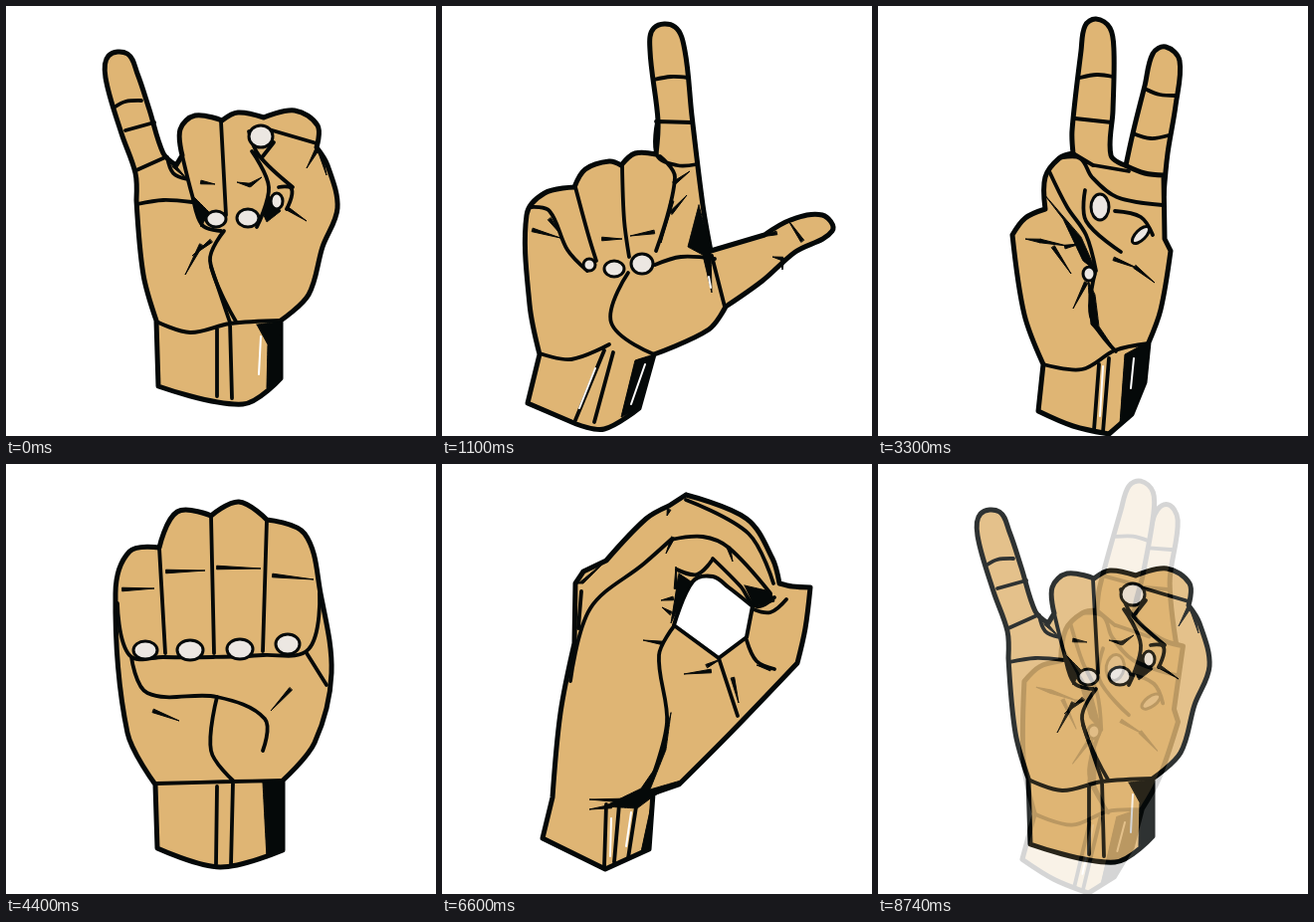
An HTML page for the animation above (8800 ms loop, 432x432 px).

```html
<!DOCTYPE html>
<html lang="en">
<head>
<meta charset="utf-8">
<title>Hand signs</title>
<style>
html, body { margin: 0; width: 100%; height: 100%; overflow: hidden; background: #fff; }
svg {
  position: absolute; inset: 0; width: 100%; height: 100%; background: #fff;
  animation: show 8800ms infinite;
  /* each sign starts fading in 300 ms before its turn */
  animation-delay: calc(var(--i) * 1100ms - 9104ms);
}
@keyframes show {
  0% { opacity: 0; z-index: 2; animation-timing-function: steps(6, start); }
  4.0909% { opacity: 1; z-index: 2; animation-timing-function: step-end; }
  12.5% { opacity: 1; z-index: 1; animation-timing-function: step-end; }
  16.6% { opacity: 0; z-index: 0; animation-timing-function: step-end; }
  100% { opacity: 0; z-index: 0; }
}
path, ellipse { stroke: #050909; stroke-linecap: round; stroke-linejoin: round; }
.skin { fill: #dfb574; stroke-width: 5; }
.line { fill: none; stroke-width: 3.8; }
.nick, .ink { fill: #050909; stroke-width: 1; }
.hole { fill: #fff; stroke-width: 4; }
.gap { fill: none; stroke: #fff; stroke-width: 2; }
ellipse { fill: #ece7e2; stroke-width: 3; }
</style>
</head>
<body>
<!-- I -->
<svg viewBox="0 0 432 432" style="--i:0">
  <path class="skin" data-p="100,72 103,50 122,48 132,68 144,104 158,148 171,160! 177,150! 175,124 190,110 217,115! 233,107 259,112! 290,105 313,120 312,142! 323,160 333,203 318,242 304,290 276,316! 276,374! 238,400 153,382! 151,316! 138,270 131,195! 130,168 116,128"/>
  <path class="line" data-p="110,101 120,96 136,95;120,125 149,117;131,165 160,152;132,199 158,195 187,197;162,152 168,168 182,174;177,150 187,190 197,220 216,226;216,116 221,210"/>
  <path class="line" data-p="247,146 264,182 252,222;244,126 254,150 288,182;258,151 269,137;264,124 312,138;219,226 205,256 231,317;274,182 287,184 282,204"/>
  <path class="line" data-p="151,317 185,328 225,319 276,316;212,324 212,392;225,318 227,394;206,262 225,318"/>
  <path class="nick" data-p="196,177 210,179;206,236 187,251;196,240 180,270;245,180 232,177;245,180 257,172;282,203 302,216;312,145 302,163;316,148 322,170;168,160 182,174"/>
  <path class="ink" data-p="187,190! 204,207! 196,222!;258,208! 264,190! 276,206! 262,217!;252,320! 276,317! 276,374! 262,384! 263,340!"/>
  <ellipse cx="211" cy="214" rx="10" ry="8"/>
  <ellipse cx="243" cy="213" rx="11" ry="9"/>
  <ellipse cx="256" cy="131" rx="12" ry="11"/>
  <ellipse cx="272" cy="196" rx="6" ry="8"/>
  <path class="gap" data-p="256,332 254,370"/>
</svg>
<!-- L -->
<svg viewBox="0 0 432 432" style="--i:1">
  <path class="skin" data-p="209,45 213,22 234,21 244,45 251,110 262,200 270,246! 324,230! 350,215 382,210 392,226 355,247 322,276 285,302! 268,325 213,350! 198,404! 163,425 135,420! 86,399! 98,350! 88,300 85,210 103,188 133,182! 144,164 168,156 180,160! 194,148 215,149! 217,115"/>
  <path class="line" data-p="213,74 230,71 247,72;215,116 251,117;216,117 216,150 236,160 256,159;219,151 234,172 215,246;181,160 183,215 188,252;134,182 147,230 155,256;90,202 108,206 126,245 146,266"/>
  <path class="line" data-p="214,260 240,252 274,254;187,268 170,318 213,350;271,251 284,302;98,349 130,355 168,340;163,346 134,416;172,348 153,418"/>
  <path class="nick" data-p="233,178 249,166;231,196 220,238;230,208 246,190;161,234 181,234;213,227 189,231;91,225 119,233;108,214 119,229;336,228 320,232;342,254 332,252;342,254 342,265;362,236 347,214"/>
  <path class="ink" data-p="258,200! 270,246! 271,288! 262,250! 247,242!;213,350! 198,404! 180,413! 194,356!"/>
  <ellipse cx="148" cy="260" rx="6" ry="6"/>
  <ellipse cx="173" cy="264" rx="10" ry="8"/>
  <ellipse cx="201" cy="259" rx="11" ry="10"/>
  <path class="gap" data-p="268,272 270,283;154,364 138,404;204,360 190,400"/>
</svg>
<!-- O -->
<svg viewBox="0 0 432 432" style="--i:2">
  <g id="ring">
    <path class="skin" data-p="245,31! 306,55 332,95 339,120! 352,123 370,124! 365,165 357,200! 290,270 238,322! 212,331! 208,387! 164,407! 101,376! 111,335! 119,250 133,180! 134,120! 142,108! 165,97! 205,55 228,42!"/>
    <path class="hole" data-p="233,162! 252,118 272,113 288,124 312,143! 306,174! 278,195!"/>
    <path class="line" data-p="245,36 308,70 333,120;230,76! 262,73 288,84 330,130;230,76 203,100 149,145 129,218;140,128 137,165;272,95 300,123 316,143 334,134;236,106 256,111 271,97"/>
    <path class="line" data-p="313,146 330,149 346,136;233,163 218,192 226,260 208,324;306,177 316,198 334,206;278,195 297,253;165,342 163,405;178,342 173,400;196,338 187,396"/>
    <path class="nick" data-p="228,46 226,52;232,74 225,90;288,84 292,98;235,125 235,103;232,135 220,137;222,180 202,177;230,150 221,144;270,208 243,211;266,203 280,196;330,206 316,202;292,215 298,240;170,344 148,347;180,338 148,337"/>
    <path class="ink" data-p="230,250! 225,287! 209,327! 240,318! 212,334! 196,346! 163,344! 200,326! 218,300!;137,120! 166,96! 142,120!;213,330! 208,386! 200,390!;238,110! 250,118! 230,160!;304,122! 330,128! 334,138! 314,143!"/>
    <path class="gap" data-p="190,350 185,384;170,356 169,394"/>
  </g>
</svg>
<!-- V -->
<svg viewBox="0 0 432 432" style="--i:3">
  <path class="skin" data-p="248,165! 256,128 268,80 276,48 289,41 303,55 299,100 291,148 287,190!"/>
  <path class="line" data-p="270,84 283,89 300,90;256,128 274,133 292,130"/>
  <g id="palm">
    <path class="skin" data-p="204,45 208,20 219,13 233,22 237,45 236,105 234,150 248,160! 268,168 287,170! 288,234! 294,246! 284,305 272,338! 268,378! 255,410! 232,430! 196,422 161,407! 166,360! 147,310 135,230! 148,213 168,204! 168,172 182,153 196,148! 195,125"/>
    <path class="line" data-p="203,72 220,69 236,71;198,113 235,117;196,148 216,160;182,153 203,153 215,172 240,192 286,200;172,166 190,202 209,230 219,266;217,160 252,166"/>
    <path class="line" data-p="208,185 209,216 244,247;238,206 264,212 276,230;218,268 214,312 239,347;166,360 205,365 238,346 272,339;222,360 217,426;232,354 226,428"/>
    <path class="nick" data-p="163,236 148,234;163,236 190,241;188,242 203,239;176,242 194,269;209,278 196,304;237,254 262,264;258,262 278,278"/>
    <path class="ink" data-p="166,188! 204,232! 219,266! 206,256! 186,214!;211,276! 218,290! 222,322! 239,347! 214,320!;272,337! 268,380! 254,411! 243,420! 248,350!"/>
    <ellipse cx="223" cy="202" rx="9" ry="13"/>
    <ellipse cx="212" cy="269" rx="6" ry="7"/>
    <ellipse cx="264" cy="230" rx="11" ry="5" transform="rotate(-45 264 230)"/>
    <path class="gap" data-p="226,362 223,412;257,354 254,384"/>
  </g>
</svg>
<!-- E -->
<svg viewBox="0 0 432 432" style="--i:4">
  <path class="skin" data-p="110,130 124,88 154,84! 172,48 206,52! 234,38 262,56! 300,70 316,130 327,210 310,280 278,318! 278,388! 215,405 152,386! 150,322! 122,270"/>
  <path class="line" data-p="154,84 160,190;206,52 209,190;262,56 258,188;112,140 124,192 158,194 208,194 258,192 304,186 315,130;126,194 142,230 212,234 260,256 258,288"/>
  <path class="line" data-p="302,190 322,222;212,234 206,288 228,318;151,321 226,319 278,318;212,324 211,402;228,320 226,403"/>
  <path class="nick" data-p="117,126 149,125;161,108 200,107;212,104 256,105;268,112 309,116;148,248 174,258;286,226 266,248"/>
  <path class="ink" data-p="258,320! 278,317! 277,387! 262,396!"/>
  <ellipse cx="140" cy="187" rx="12" ry="9"/>
  <ellipse cx="185" cy="187" rx="13" ry="10"/>
  <ellipse cx="235" cy="186" rx="13" ry="10"/>
  <ellipse cx="283" cy="181" rx="12" ry="10"/>
</svg>
<!-- Y -->
<svg viewBox="0 0 432 432" style="--i:5">
  <path class="skin" data-p="33,108 35,87 53,83 66,98 90,124 121,156! 132,142 166,140! 173,126 215,124! 222,111 258,109 282,133 302,184! 333,150 378,121 405,122 402,138 372,178 350,220 325,277 278,319! 275,364! 236,397! 200,397 156,380! 149,330! 118,275 97,192 72,162"/>
  <path class="line" data-p="56,138 74,132 86,121;76,162 84,144 99,135;94,188 121,173;104,215 134,219;122,156 137,212 168,244 200,244;166,140 172,185 191,234;215,124 217,175 233,226;270,124 265,192 252,226 222,246"/>
  <path class="line" data-p="240,234 208,256 198,288 232,319 278,318;199,284 207,322;149,341 183,341 208,325;205,326 205,396;214,324 217,396;256,328 255,386;267,322 264,377;222,329 252,332"/>
  <path class="nick" data-p="182,220 155,222;218,211 194,213;222,188 245,185;344,182 330,161;303,190 316,233;291,204 293,218;268,205 300,188;270,172 288,168;354,189 365,185;85,154 91,145;122,192 138,214"/>
  <path class="ink" data-p="270,124! 292,150! 274,174! 266,192! 271,156!;148,338! 183,342! 204,326! 206,334! 180,350!;268,322! 278,318! 275,364! 263,378!"/>
  <ellipse cx="186" cy="241" rx="9" ry="6" transform="rotate(-20 186 241)"/>
  <ellipse cx="218" cy="239" rx="12" ry="7"/>
  <ellipse cx="243" cy="222" rx="12" ry="8"/>
  <path class="gap" data-p="180,345 196,336;210,336 210,388"/>
</svg>
<!-- O -->
<svg viewBox="0 0 432 432" style="--i:6"><use href="#ring"/></svg>
<!-- U -->
<svg viewBox="0 0 432 432" style="--i:7">
  <g transform="rotate(9 215 300)">
    <path class="skin" data-p="235,165! 237,50 248,32 262,46 264,110 287,190!"/>
    <path class="line" data-p="238,78 263,76;237,118 265,116"/>
    <use href="#palm"/>
  </g>
</svg>
<script>
// Smooth curve through points; "!" marks a sharp corner.
function spline(text, closed) {
  const p = text.split(' ').map(w => {
    const [x, y] = w.split(',').map(parseFloat);
    return { x, y, hard: w.endsWith('!') };
  });
  const n = p.length, at = i => p[(i + n) % n];
  const dir = i => {
    if (at(i).hard || (!closed && (i === 0 || i === n - 1))) return [0, 0];
    const a = at(i - 1), b = at(i + 1), len = Math.hypot(b.x - a.x, b.y - a.y);
    return [(b.x - a.x) / len, (b.y - a.y) / len];
  };
  let d = `M${p[0].x} ${p[0].y}`;
  for (let i = 0; i < (closed ? n : n - 1); i++) {
    const a = at(i), b = at(i + 1), u = dir(i), v = dir(i + 1);
    const k = Math.hypot(b.x - a.x, b.y - a.y) / 3;
    d += `C${a.x + u[0] * k} ${a.y + u[1] * k} ${b.x - v[0] * k} ${b.y - v[1] * k} ${b.x} ${b.y}`;
  }
  return d;
}

// Pen mark, thick at the first point and sharp at the second.
function wedge(text) {
  const [[ax, ay], [bx, by]] = text.split(' ').map(w => w.split(',').map(Number));
  const k = 1.8 / Math.hypot(bx - ax, by - ay);
  const nx = (ay - by) * k, ny = (bx - ax) * k;
  return `M${ax + nx} ${ay + ny}L${bx} ${by}L${ax - nx} ${ay - ny}Z`;
}

for (const el of document.querySelectorAll('[data-p]')) {
  const kind = el.getAttribute('class');
  const closed = ['skin', 'ink', 'hole'].includes(kind);
  const draw = kind === 'nick' ? wedge : s => spline(s, closed);
  el.setAttribute('d', el.dataset.p.split(';').map(draw).join(''));
}
</script>
</body>
</html>
```
